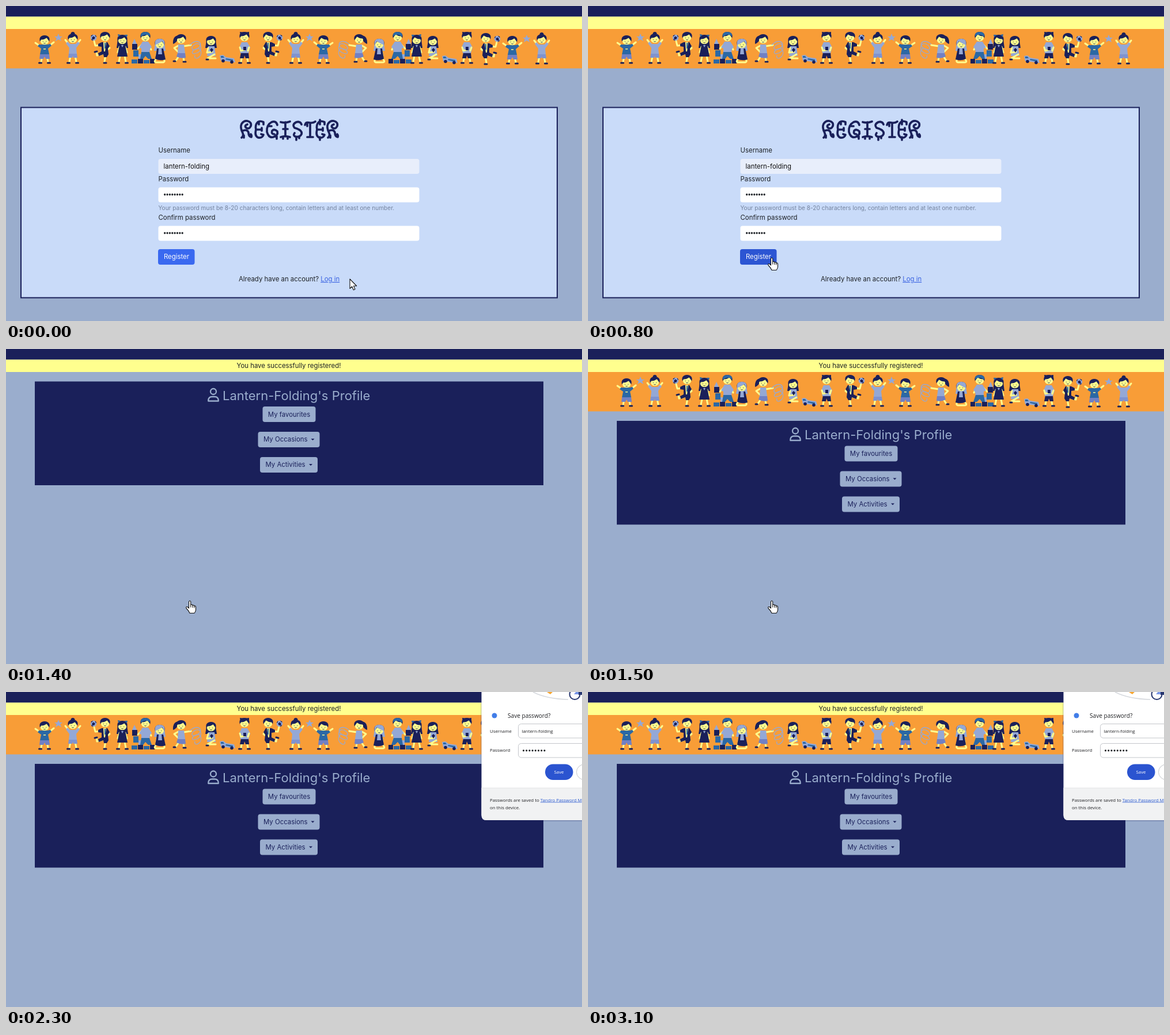
Recreate the animation shown at these times as an HTML page. Size 1000 by 548 pixels, loop 3400 ms.

```html
<!DOCTYPE html>
<html lang="en">
<head>
<meta charset="utf-8">
<title>Register and profile</title>
<style>
html, body { margin: 0; width: 100%; height: 100%; overflow: hidden; background: #9aadcd; }
svg { display: block; width: 100vw; height: 100vh; }
text { font: 11.4px Inter, sans-serif; }
.mid { text-anchor: middle; }
.navy { fill: #1a205a; }
.blue { fill: #2b68a5; }
.lav { fill: #94a8d6; }
.skin { fill: #ffff8e; }
.limb { fill: none; stroke: #ffff8e; stroke-width: 3; stroke-linecap: round; stroke-linejoin: round; }
.shoe { fill: none; stroke: #1a205a; stroke-width: 3; stroke-linecap: round; }
.dots { stroke: #1d2126; stroke-linecap: round; }
.lettering { fill: none; stroke: #1a205a; stroke-width: 3.7; stroke-linecap: round; stroke-linejoin: round; }
.small text { font: 7.85px "Open Sans", "Noto Sans", sans-serif; fill: #202124; }
.small .title { font-size: 10.1px; }
.btn { fill: #9aadcd; }

/* One 3.4 s loop, every change lands on a 100 ms beat */
.form, .done, .banner, .body, .popup, .hover, .pointer, .arrow, .hand { animation: 3.4s step-end infinite; }
.form { animation-name: form; }
.done { animation-name: done; }
.banner { animation-name: banner; }
.body { animation-name: body; }
.popup { animation-name: popup; }
.hover { animation-name: hover; }
.pointer { animation-name: move; }
.arrow { animation-name: arrow; }
.hand { animation-name: hand; }
@keyframes form { 0% { visibility: visible } 41.17%, 100% { visibility: hidden } }
@keyframes done { 0% { visibility: hidden } 41.17%, 100% { visibility: visible } }
@keyframes banner { 0% { visibility: visible } 41.17% { visibility: hidden } 44.11%, 100% { visibility: visible } }
@keyframes body { 0% { transform: none } 44.11%, 100% { transform: translateY(68.5px) } }
@keyframes popup { 0% { visibility: hidden } 49.99%, 100% { visibility: visible } }
@keyframes hover { 0% { fill: #3a69f0 } 14.7%, 100% { fill: #2c55d3 } }
@keyframes arrow { 0% { visibility: visible } 14.7% { visibility: hidden } 47.05% { visibility: visible } 67.64%, 100% { visibility: hidden } }
@keyframes hand { 0% { visibility: hidden } 14.7% { visibility: visible } 47.05%, 100% { visibility: hidden } }
@keyframes move {
  0% { transform: translate(597px, 475px) }
  2.94% { transform: translate(556px, 468px) }
  5.88% { transform: translate(462px, 451px) }
  8.82% { transform: translate(375px, 440px) }
  11.76% { transform: translate(331px, 437px) }
  14.7% { transform: translate(319px, 438px) }
  47.05% { transform: translate(323px, 434px) }
  49.99% { transform: translate(339px, 414px) }
  52.94% { transform: translate(361px, 385px) }
  55.88% { transform: translate(470px, 300px) }
  58.82% { transform: translate(650px, 190px) }
  61.76% { transform: translate(840px, 90px) }
  64.7%, 100% { transform: translate(988px, 22px) }
}
</style>
</head>
<body>
<svg viewBox="0 0 1000 548" preserveAspectRatio="none">
<defs>
  <g id="face"><g transform="scale(.9)">
    <path class="skin" d="M-8 0Q-8-8 0-8Q8-8 8 0Q8 8 0 8Q-8 8-8 0Z"/>
    <path class="navy" d="M-9 2Q-12-9 0-10Q12-9 9 2Q7-1 4-5Q-2-1-6-2Q-8 0-9 2Z"/>
    <path d="M-3 1v1.4M3 1v1.4M-2 5q2 1.5 4 0" fill="none" stroke="#1a205a"/>
  </g></g>
  <g id="legs">
    <path class="limb" d="M-4 87L-6 97M4 87L6 97"/>
    <path class="shoe" d="M-9.500 99h4M5.500 99h4"/>
  </g>
  <path id="star" class="lav" d="M0-7L2-2L7-2L3 1L5 6L0 3L-5 6L-3 1L-7-2L-2-2Z"/>
  <g id="ball">
    <circle class="lav" r="5.3"/>
    <path class="navy" d="M0-2.500L3 0L1 3H-2L-3 0ZM-5-3L-1-5.500L-3-2ZM3-5L5.500-1L3-2ZM-4 4L0 5.500L-3 2Z"/>
  </g>
  <path id="coil" d="M-10-8C3-22 15-10 5-3S-11-3-1-9S14 0 4 5S-10 4 0-1S12 7 7 12S-3 15-1 10" fill="none" stroke="#94a8d6" stroke-width="1.3"/>
  <g id="car">
    <path class="lav" d="M-13-6L-7-7L-2-3L12-1L14 6L-11 3Z"/>
    <path class="blue" d="M-11-5H-7L-5-2H-11ZM-2-1L10 1V4L-3 1Z"/>
    <circle class="navy" cx="-7" cy="3.500" r="2.800"/><circle class="navy" cx="8" cy="5.500" r="2.800"/>
  </g>
  <g id="waver">
    <path class="limb" d="M-6 71L-16 64M6 71L16 63"/>
    <use href="#legs"/>
    <path class="blue" d="M-5 67H5L10 66L12 69L6 74L8 84H-8L-6 74L-12 70L-10 67Z"/>
    <path d="M-8 84H8L9 92H2L0 88L-2 92H-9Z" fill="#7180c4"/>
    <use href="#face" y="60"/>
    <path class="skin" d="M-2 74h4v1.500h-4Z"/>
  </g>
  <g id="bun">
    <path class="limb" d="M-5 69L-13 59M5 69L13 59"/>
    <use href="#legs"/>
    <path class="lav" d="M-5 66H5L9 62L12 65L6 73L7 83H-7L-6 73L-12 65L-9 62Z"/>
    <path d="M-7 83H7L8 90H1L0 87L-1 90H-8Z" fill="#7f93d0"/>
    <circle class="navy" cy="48.500" r="3.500"/><use href="#face" y="57"/>
    <use href="#star" transform="translate(0 75) scale(.45)" style="fill:#2b68a5"/>
  </g>
  <g id="runner">
    <path class="limb" d="M-4 68L-15 69L-17 61M6 67L10 73L5 77M-2 83L-12 86L-13 80M3 84L1 97"/>
    <path class="shoe" d="M-16 80l4-1M0 99h4"/>
    <path class="navy" d="M-4 63H6L10 70L7 74L8 84L5 89H0L-1 84L-9 87L-10 82L-4 79V71L-10 70V66Z"/>
    <path class="skin" d="M-1 63H4L2 79H0Z"/><path class="blue" d="M1 64h2v10h-2Z"/>
    <use href="#face" x="2" y="54"/><use href="#ball" x="-18" y="55"/>
  </g>
  <g id="dress">
    <path class="navy" d="M-8 58Q0 46 8 58L10 73H-10Z"/>
    <path class="limb" d="M-5 71L-8 81M5 71L8 81"/>
    <use href="#legs"/><path class="navy" d="M-5 68H5L9 88H-9Z"/>
    <path class="lav" d="M-2 68H2L0 72Z"/>
    <use href="#face" y="59"/><path class="blue" d="M3 50L9 50L8 54ZM-3 50L-8 49L-7 54Z"/>
  </g>
  <g id="blocks">
    <path class="navy" d="M-23 66h9v10h-9ZM-13 92h9v8h-9ZM8 92h8v8H8Z"/>
    <path class="blue" d="M-21 77h9v11h-9ZM-24 93h10v7h-10ZM-3 94h10v6h-10Z"/>
    <path class="lav" d="M-19 57l4 9h-8ZM-12 84h6v8h-6Z"/>
    <path class="limb" d="M-5 66L-13 74M5 66L10 76"/>
    <path class="lav" d="M-5 62H5L11 71L8 75L7 81H-7V74L-11 72Z"/>
    <path class="blue" d="M-7 80H7L11 92H5L0 87L-4 92H-9Z"/>
    <use href="#face" y="54"/><path class="blue" d="M-8 53Q-9 45 0 45Q9 45 8 53Q3 47-8 53Z"/>
  </g>
  <g id="kneel">
    <path class="lav" d="M-8 65Q0 50 8 65L10 78H-10Z"/>
    <path class="limb" d="M-7 93Q-11 98-6 98H6Q10 97 7 93M-4 77L-6 86L2 85"/>
    <path class="navy" d="M-5 74H6L10 93Q1 96-8 92Z"/><path class="lav" d="M-2 74H3L4 84H-3Z"/>
    <use href="#face" y="66"/><path class="lav" d="M-8 68Q-10 57 0 57Q10 57 8 68Q6 64 4 61Q-2 66-8 68Z"/>
  </g>
  <g id="pony">
    <path class="navy" d="M-4 51Q-15 52-14 66Q-9 65-5 57Z"/>
    <path class="limb" d="M4 70L17 68M-5 69L-12 73L-6 79M-3 86L-9 95M3 86L5 95"/>
    <path class="shoe" d="M-13 96h3M4 97h4"/>
    <path class="lav" d="M-5 67H5L7 82H-6Z"/>
    <path d="M-6 82H7L8 90Q0 92-8 88Z" fill="#7180c4"/><use href="#face" y="58"/>
  </g>
  <g id="crouch">
    <path class="navy" d="M-8 60Q0 48 8 60L10 73H-10Z"/>
    <path class="lav" d="M-5 70H6L8 87H-7Z"/>
    <path class="limb" d="M-5 73L-7 81L2 80M6 84L-6 91H8"/><path class="shoe" d="M-8 93h3"/>
    <path class="navy" d="M-2 76L1 73L4 76L1 81Z"/><use href="#face" y="61"/>
  </g>
  <g id="boy">
    <use href="#legs"/><path class="navy" d="M-6 81H7L8 91H2L0 86L-1 91H-8Z"/>
    <path class="lav" d="M-5 63H5L10 72L7 82H-7L-9 72Z"/>
    <path class="limb" d="M-8 72L-6 78L1 76M8 72L6 78"/>
    <path class="navy" d="M-2 71h5v6h-5ZM-8 45Q0 46 8 45L8 51H-7Z"/>
    <use href="#face" y="54"/>
  </g>
  <path id="R" d="M4 31Q8 28 6 23Q1 13 4 7Q8 1 14 2Q22 4 20 11Q17 17 12 14Q8 10 14 8M6 19Q14 16 16 22Q16 29 21 30Q22 27 20 25M8 27V31"/>
  <path id="E" d="M18 8V4Q12 1 8 4Q3 9 5 17Q2 28 9 31Q16 32 18 26L14 25M5 17H15M15 14V19M10 4V8"/>
</defs>

<rect width="1000" height="548" fill="#9aadcd"/>
<rect class="navy" width="1000" height="18.5"/>
<rect y="18.500" width="1000" height="21.500" fill="#ffff8e"/>

<g class="form">
  <rect x="26" y="176.500" width="931" height="331" fill="#c9dbf9" stroke="#1a205a" stroke-width="2"/>
  <g class="lettering" role="img" aria-label="Register" transform="translate(405 198)">
    <use href="#R"/><use href="#E" x="24"/>
    <path d="M66 9Q64 1 56 4Q47 9 48 21Q51 32 59 30Q68 27 66 20Q61 15 57 19Q55 25 61 25M65 28V33M52 11H56"/>
    <path d="M72 4Q80 6 88 3M80 4V29M72 30Q80 27 88 30M76 16H84M76 30V33M84 30V33"/>
    <path d="M108 8Q106 2 99 4Q91 8 96 14Q110 18 108 25Q105 31 97 29Q93 27 96 23M99 30V35M104 29V32"/>
    <path d="M114 9Q115 3 122 5Q128 6 132 3M123 5V30M118 30H128M118 6V11"/>
    <use href="#E" x="130"/><path d="M140 0V4M140 30V35"/><use href="#R" x="150"/>
  </g>
  <g fill="#1d2126">
    <text x="264.500" y="255">Username</text>
    <text x="264.500" y="304.500">Password</text>
    <text x="264.500" y="371.500">Confirm password</text>
    <text x="404" y="479">Already have an account? <tspan fill="#3a63e2" text-decoration="underline">Log in</tspan></text>
  </g>
  <g fill="#fff">
    <rect x="264.500" y="266" width="453" height="26" rx="4" fill="#e8eefb"/>
    <rect x="264.500" y="315.500" width="453" height="26" rx="4"/>
    <rect x="264.500" y="382.500" width="453" height="26" rx="4"/>
  </g>
  <text x="273.500" y="283" fill="#111">lantern-folding</text>
  <path class="dots" d="M275.700 328H307M275.700 395H307" stroke-width="3.400" stroke-dasharray="0 4.350"/>
  <text x="264.500" y="355.300" fill="#75849f" style="font-size:10.1px">Your password must be 8-20 characters long, contain letters and at least one number.</text>
  <rect class="hover" x="264" y="423" width="63.500" height="27" rx="4"/>
  <text class="mid" x="296" y="440" fill="#fff">Register</text>
</g>

<g class="done">
  <text class="mid" x="491" y="33" fill="#1d2126">You have successfully registered!</text>
  <g class="body">
    <rect class="navy" x="50" y="56.500" width="883" height="180.500"/>
    <g fill="none" stroke="#9aadcd" stroke-width="2.300" stroke-linejoin="round">
      <circle cx="360" cy="74" r="5"/><path d="M351.200 90.500Q351 83 358 83H362Q369 83 368.800 90.500Z"/>
    </g>
    <text x="376" y="88.500" fill="#9aadcd" style="font-size:22px">Lantern-Folding's Profile</text>
    <rect class="btn" x="445.500" y="100" width="92" height="27" rx="4"/>
    <rect class="btn" x="437.500" y="144" width="107" height="27" rx="4"/>
    <rect class="btn" x="441" y="188" width="100" height="27" rx="4"/>
    <g class="navy">
      <text class="mid" x="491.500" y="117.500">My favourites</text>
      <text x="447" y="161">My Occasions</text>
      <text x="450.500" y="205">My Activities</text>
      <path d="M529.500 156h6l-3 3ZM526 200h6l-3 3Z"/>
    </g>
  </g>
</g>

<g class="banner">
  <rect y="40" width="1000" height="68.500" fill="#f89d37"/>
  <use href="#waver" x="67"/><use href="#star" x="91" y="55"/><use href="#bun" x="116"/>
  <use href="#runner" x="170"/><use href="#dress" x="202"/><use href="#blocks" x="242"/><use href="#kneel" x="267"/>
  <use href="#pony" x="304"/><use href="#coil" x="329" y="76"/><use href="#crouch" x="356"/><use href="#car" x="384" y="92"/>
  <use href="#boy" x="414"/>
  <use href="#runner" transform="translate(457) scale(-1 1)"/><use href="#bun" x="503"/>
  <use href="#star" x="527" y="55"/><use href="#waver" transform="translate(551) scale(-1 1)"/>
  <use href="#coil" transform="translate(587 76) scale(-1 1)"/><use href="#pony" transform="translate(613) scale(-1 1)"/>
  <use href="#blocks" transform="translate(680) scale(-1 1)"/><use href="#kneel" transform="translate(648) scale(-1 1)"/>
  <use href="#dress" transform="translate(713) scale(-1 1)"/><use href="#crouch" x="741"/><use href="#car" x="770" y="93"/>
  <use href="#boy" x="800"/><use href="#runner" transform="translate(835 2) scale(-1 1)"/>
  <use href="#waver" x="879" y="1"/><use href="#star" x="904" y="57"/><use href="#bun" x="930" y="1"/>
</g>

<g class="popup small">
  <path d="M824 0H1000V225H834Q824 225 824 214Z" fill="#1a205a" opacity=".2"/>
  <path d="M825.500 0H1000V223H834Q825.500 223 825.500 214Z" fill="#fff"/>
  <path d="M825.500 167H1000V223H834Q825.500 223 825.500 214Z" fill="#f1f2f3"/>
  <path d="M825.500 167H1000" stroke="#e2e3e5"/>
  <path d="M915 0Q938 12 976 13" fill="none" stroke="#d5d8dd" stroke-width="1.500"/>
  <path d="M939 0H949L945 4Z" fill="#f8a52c"/>
  <circle cx="987.500" cy="4" r="9" fill="#fff" stroke="#26366f" stroke-width="2"/>
  <path d="M986 4L991-2H1000V4Z" fill="#7795e8"/><path d="M994 0H1000V5H994Z" fill="#26366f"/>
  <circle cx="848" cy="41" r="4.500" fill="#427de8"/>
  <text class="title" x="871" y="44.500">Save password?</text>
  <text x="840" y="70.500">Username</text>
  <text x="840" y="104">Password</text>
  <g fill="#fff" stroke="#c3c6ca">
    <rect x="889.500" y="55.500" width="130" height="24.500" rx="5"/>
    <rect x="889.500" y="89.500" width="130" height="24.500" rx="5"/>
    <rect x="990.500" y="126" width="50" height="26.500" rx="13.200"/>
  </g>
  <text x="895.500" y="70.500">lantern-folding</text>
  <path class="dots" d="M898.500 101.800H936" stroke-width="3.200" stroke-dasharray="0 5.200"/>
  <rect x="936" y="125.500" width="48.500" height="27.500" rx="13.700" fill="#2b54d0"/>
  <text class="mid" x="960" y="142.300" style="fill:#fff">Save</text>
  <text x="840" y="190.500">Passwords are saved to <tspan style="fill:#2c5bd0" text-decoration="underline">Tandro Password M</tspan></text>
  <text x="840" y="204">on this device.</text>
</g>

<g class="pointer" fill="#fff" stroke="#111" stroke-width="1.100" stroke-linejoin="round">
  <path class="arrow" d="M0 0V16.500L3.700 13L6.300 19L9 17.800L6.500 12H11.700Z"/>
  <g class="hand">
    <path d="M-1.500 13V1.500Q0-1.500 1.700 1.500V7Q4 5.500 5 8Q7 7 8 9Q10.500 8.500 10.500 11V16Q10 19 8 21.500H0Q-2 17-6 13Q-7 10-4 10.500Z"/>
    <path d="M1.700 7V11.500M5 8V12M8 9V12.500" fill="none"/>
  </g>
</g>
</svg>
</body>
</html>
```
